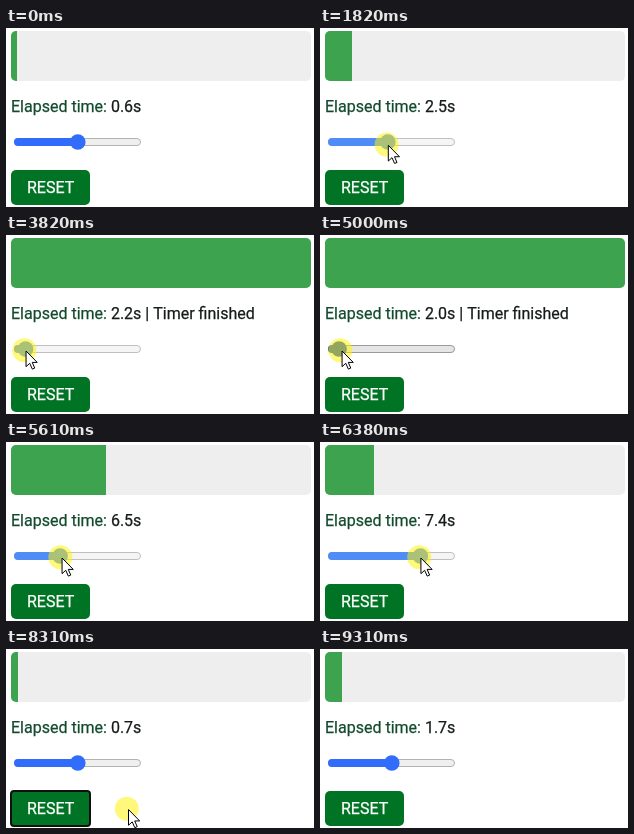
Write an HTML page with a canvas that moves like this. It is 308x179 px and loops after 9.39 s.

```html
<!DOCTYPE html>
<html lang="en">
<head>
<meta charset="utf-8">
<title>Timer</title>
<style>
html, body { margin: 0; width: 100%; height: 100%; overflow: hidden; background: #fff; }
canvas { display: block; }
</style>
</head>
<body>
<canvas id="stage" width="308" height="179"></canvas>
<script>
const ctx = document.getElementById('stage').getContext('2d');
const LOOP = 9390;
const RESET_AT = 7690;
const BLUR_AT = 9310;

const trackColors = {
  normal: { fill: '#326cfb', back: '#efefef', edge: '#b2b2b2' },
  hover: { fill: '#1d55c8', back: '#e5e5e5', edge: '#9a9a9a' },
  active: { fill: '#4f8cf6', back: '#f5f5f5', edge: '#c0c0c0' }
};

const between = (t, a, b) => t >= a && t < b;

// Smooth change by `delta` from time a to time b.
function glide(t, a, b, delta) {
  const u = Math.min(1, Math.max(0, (t - a) / (b - a)));
  return delta * u * u * (3 - 2 * u);
}

// Slider value in seconds: dragged left twice, far right, then back to the middle.
const durationAt = t => 30
  + glide(t, 1500, 3130, -21)
  + glide(t, 3200, 3900, -7)
  + glide(t, 5080, 6250, 43.2)
  + glide(t, 6400, 6920, -15.2);

const thumbX = duration => 15.3 + duration / 60 * 113;

function runningAt(t) {
  if (t >= RESET_AT) return (t - RESET_AT) / 1000 * 1.05;
  const s = t / 1000;
  return 0.6 + 1.071 * s - 0.002 * s * s;
}

// The pointer comes in, follows the thumb, clicks the button and leaves.
function cursorAt(t, thumb) {
  return {
    x: thumb + 112 + glide(t, 70, 880, -112) + glide(t, 4280, 4520, 2.5)
      + glide(t, 5080, 6250, -2.5) + glide(t, 7000, 7400, -3) + glide(t, 8000, 8900, 193),
    y: 174 + glide(t, 70, 880, -57) + glide(t, 1500, 3130, -1.5)
      + glide(t, 7000, 7400, 38.5) + glide(t, 8000, 8900, 22)
  };
}

function roundRect(x, y, w, h, r) {
  ctx.beginPath();
  ctx.roundRect(x, y, w, h, r);
}

function disc(x, y, r, color) {
  ctx.beginPath();
  ctx.arc(x, y, r, 0, Math.PI * 2);
  ctx.fillStyle = color;
  ctx.fill();
}

// Draws text with slightly heavier stems and returns its right end.
function write(text, x, y, color) {
  ctx.font = '16px Roboto, sans-serif';
  ctx.fillStyle = ctx.strokeStyle = color;
  ctx.lineWidth = 0.25;
  ctx.fillText(text, x, y);
  ctx.strokeText(text, x, y);
  return x + ctx.measureText(text).width;
}

function drawBar(part) {
  ctx.save();
  roundRect(5, 3, 300, 50, 5);
  ctx.clip();
  ctx.fillStyle = '#eeeeee';
  ctx.fillRect(5, 3, 300, 50);
  ctx.fillStyle = '#3ea34f';
  ctx.fillRect(5, 3, Math.round(300 * part), 50);
  ctx.restore();
}

function drawSlider(x, state) {
  const { fill, back, edge } = trackColors[state];
  roundRect(8.5, 110.5, 126, 7, 3.5);
  ctx.fillStyle = back;
  ctx.fill();
  ctx.strokeStyle = edge;
  ctx.lineWidth = 1;
  ctx.stroke();
  ctx.save();
  roundRect(8, 110, 127, 8, 4);
  ctx.clip();
  ctx.fillStyle = fill;
  ctx.fillRect(8, 110, x - 8, 8);
  ctx.restore();
  disc(x, 114, 7.8, fill);
}

function drawButton(hover, focus) {
  roundRect(5, 142, 79, 35, focus ? 3 : 5);
  ctx.fillStyle = hover ? '#3ea34f' : '#007424';
  ctx.fill();
  if (focus) {
    ctx.strokeStyle = '#101010';
    ctx.lineWidth = 2;
    ctx.stroke();
  }
  write('RESET', 21, 165, '#fff');
}

const arrow = new Path2D('M.5 .5V16.2L4.2 12.8L6.8 18.6L9.2 17.6L6.7 11.9H11.7Z');
const hand = new Path2D('M-1.5 1.2C-1.5 -1 2 -1 2 1.2V7.5C3 6.6 5 7 5.2 8.4' +
  'C6.2 7.6 8 8.2 8.2 9.5C9.4 9 10.6 9.8 10.6 11.2V16L8.5 20V22.5H-.5V20.5' +
  'L-5.3 13.8C-6.3 12 -4 10.4 -2.7 11.9L-1.5 13.3Z');
const fingers = new Path2D('M2 7.5V12M5.2 8.4V12.5M8.2 9.5V13');

function drawCursor(x, y, pointing) {
  ctx.save();
  ctx.translate(x, y);
  disc(-1.2, -0.3, 12, 'rgba(255,242,0,.52)');
  const shape = pointing ? hand : arrow;
  ctx.fillStyle = '#fff';
  ctx.strokeStyle = '#000';
  ctx.lineWidth = 1;
  ctx.fill(shape);
  ctx.stroke(shape);
  if (pointing) ctx.stroke(fingers);
  ctx.restore();
}

function draw(t) {
  const duration = durationAt(t);
  const running = runningAt(t);
  const elapsed = Math.min(running, duration);
  const thumb = thumbX(duration);
  const { x, y } = cursorAt(t, thumb);

  const visible = between(t, 70, 8930);
  const onButton = visible && between(x, 5, 84) && between(y, 142, 177);
  const onSlider = visible && between(x, 7, 136) && between(y, 106, 122);
  const pressed = between(t, 1500, 4280) || between(t, 5080, 7000);

  ctx.fillStyle = '#fff';
  ctx.fillRect(0, 0, 308, 179);
  drawBar(elapsed / duration);
  const end = write('Elapsed time: ', 5, 84, '#124a2e');
  write(elapsed.toFixed(1) + 's' + (running >= duration ? ' | Timer finished' : ''), end, 84, '#161c19');
  drawSlider(thumb, pressed ? 'active' : onSlider ? 'hover' : 'normal');
  drawButton(onButton, between(t, 7600, BLUR_AT));
  if (visible) drawCursor(x, y, onButton);
}

const start = performance.now();
function tick() {
  draw((performance.now() - start) % LOOP);
  requestAnimationFrame(tick);
}
tick();
</script>
</body>
</html>
```
